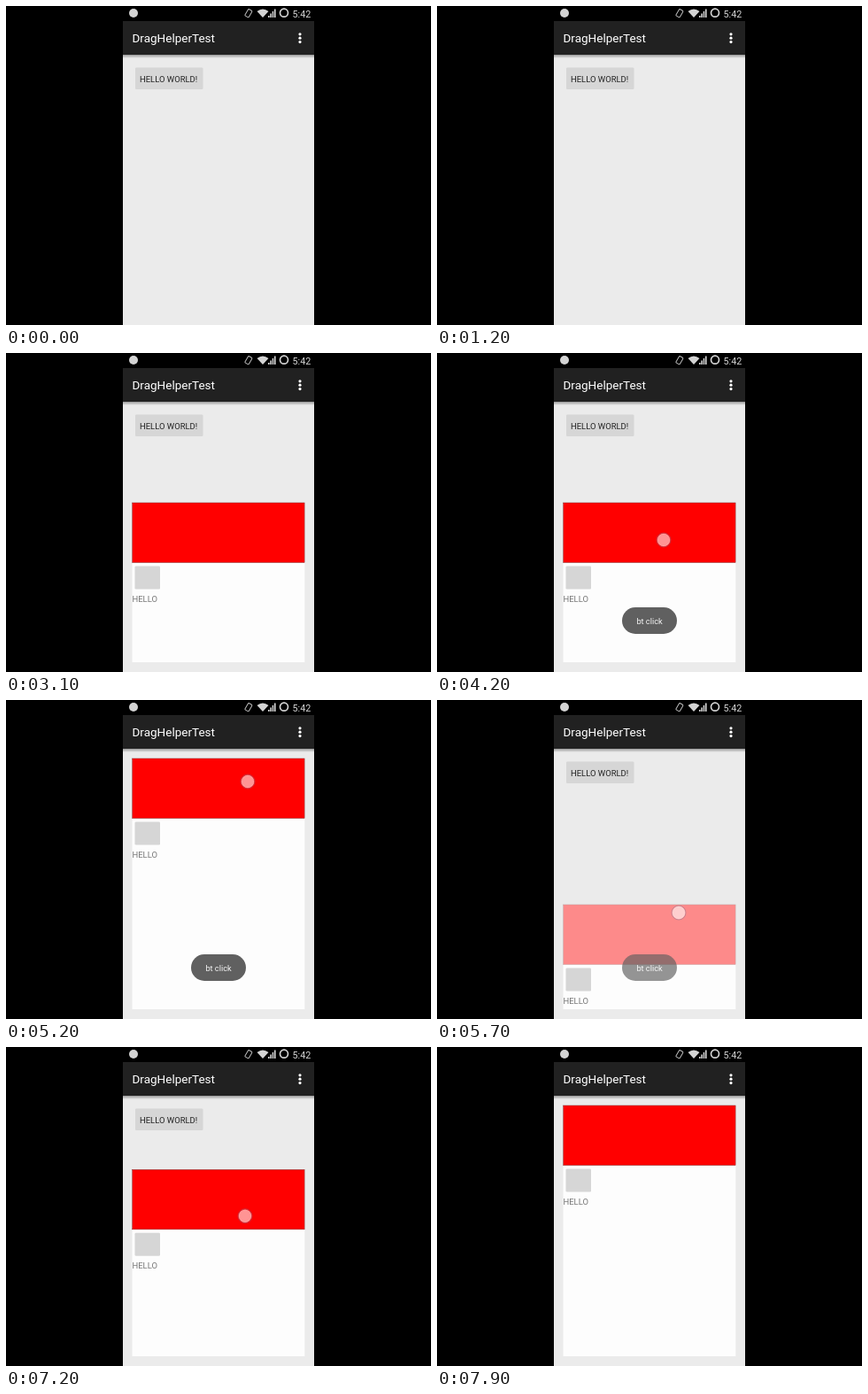
These frames come from a looping animation (480x360 px, 8000 ms). An HTML page:

```html
<!DOCTYPE html>
<html lang="en">
<head>
<meta charset="utf-8">
<title>DragHelperTest</title>
<style>
  html, body { margin: 0; width: 100%; height: 100%; overflow: hidden; background: #000; }
  svg { display: block; width: 100vw; height: 100vh; }
  text { font-family: Roboto, "Open Sans", sans-serif; font-size: 9.45px; }
</style>
</head>
<body>
<svg viewBox="0 0 480 360">
  <defs>
    <linearGradient id="shade" x2="0" y2="1">
      <stop offset="0" stop-color="#000" stop-opacity=".35"/>
      <stop offset="1" stop-color="#000" stop-opacity="0"/>
    </linearGradient>
    <clipPath id="area"><rect x="142" y="65" width="196" height="284"/></clipPath>
  </defs>
  <rect width="480" height="360"/>
  <rect x="132" y="17" width="216" height="343" fill="#ebebeb"/>

  <g fill="#d4d4d4">
    <circle cx="144" cy="8" r="5"/>
    <rect x="271.5" y="4" width="5" height="8.5" rx="1" transform="rotate(30 274 8)" fill="none" stroke="#bbb"/>
    <path d="M290 13 L283.5 6 Q290 1 296.5 6 Z"/>
    <path d="M296 13h1.6v-2H296zM298.3 13h1.6V8.500h-1.600zM300.700 13h1.600V6h-1.600zM303 13h1.600V3.500H303z"/>
    <circle cx="314" cy="7.700" r="4.500" fill="none" stroke="#d4d4d4" stroke-width="1.700"/>
    <text x="323.500" y="12.500" style="font-size:10.800px">5:42</text>
  </g>

  <rect x="132" y="17" width="216" height="38" fill="#212121"/>
  <rect x="132" y="55" width="216" height="4" fill="url(#shade)"/>
  <text x="142.500" y="41" fill="#fff" style="font-size:13.500px">DragHelperTest</text>
  <g fill="#fff">
    <circle cx="332" cy="31.800" r="1.600"/>
    <circle cx="332" cy="36.200" r="1.600"/>
    <circle cx="332" cy="40.600" r="1.600"/>
  </g>

  <rect id="mainButton" x="146" y="69.500" width="76.500" height="24.500" rx="1.300"/>
  <text x="151" y="85.500" fill="#222">HELLO WORLD!</text>

  <g clip-path="url(#area)">
    <g id="panel">
      <rect x="142.500" width="194.800" height="290" fill="#fdfdfd"/>
      <rect id="header" x="142.700" width="194.400" height="67.500" fill="#f00" stroke="#803030" stroke-width=".5"/>
      <rect id="smallButton" x="145.500" y="71.500" width="28.500" height="26" rx="1.300"/>
      <text x="142.500" y="112" fill="#757575">HELLO</text>
    </g>
  </g>

  <g id="toast">
    <rect x="209" y="287" width="62" height="30" rx="15" fill="#606060"/>
    <text x="240" y="306" fill="#f4f4f4" text-anchor="middle" style="font-size:9.200px">bt click</text>
  </g>

  <g id="finger">
    <circle r="8" fill="none" stroke="#77779a" stroke-opacity=".4"/>
    <circle r="7" fill="#fff" fill-opacity=".58" stroke="#fff" stroke-opacity=".35"/>
  </g>
</svg>
<script>
const LOOP = 8000, STEP = 100;
const TOP = 66, REST = 169, LOW = 282, HIDDEN = 350;
const el = id => document.getElementById(id);
const [panel, header, mainButton, smallButton, toast, finger] =
  ["panel", "header", "mainButton", "smallButton", "toast", "finger"].map(el);

// Each key: [time, value, "out" for a decelerating approach]
const panelKeys = [
  [1500, HIDDEN], [1900, REST, "out"], [1950, REST], [2200, 270], [2300, 260],
  [2700, REST, "out"], [4200, REST], [4500, 232], [4600, 232], [5000, TOP],
  [5300, TOP], [5700, 231], [6000, REST, "out"], [6200, REST], [6500, 250],
  [6700, LOW], [7000, REST, "out"], [7150, REST], [7600, TOP, "out"]
];
const toastKeys = [[3700, 0], [3900, 1], [5600, 1], [5900, 0]];

const touches = [
  { from: 300, to: 600, x: [[0, 183]], y: [[0, 82]] },
  { from: 1950, to: 2300, x: [[1950, 248], [2200, 251]], y: [[1950, 215], [2200, 316]] },
  { from: 3500, to: 3800, x: [[0, 160]], y: [[0, 254]] },
  { from: 4100, to: 5800, x: [[4200, 256], [5200, 273]],
    y: [[4200, 211], [4500, 274], [4600, 274], [5200, 92], [5300, 75], [5700, 240]] },
  { from: 6300, to: 6800, x: [[0, 271]], y: [[6200, 178], [6500, 259], [6700, 291]] },
  { from: 7100, to: 7500, x: [[0, 270]], y: [[7150, 205], [7500, 105]] }
];

function sample(keys, t) {
  if (t <= keys[0][0]) return keys[0][1];
  for (let i = 1; i < keys.length; i++) {
    const [t0, v0] = keys[i - 1], [t1, v1, ease] = keys[i];
    if (t > t1) continue;
    const p = (t - t0) / (t1 - t0);
    return v0 + (v1 - v0) * (ease ? 1 - (1 - p) ** 3 : p);
  }
  return keys[keys.length - 1][1];
}

const within = (t, from, to) => t >= from && t < to;
const buttonColor = pressed => pressed ? "#c0c0c0" : "#d6d6d6";

function draw(t) {
  const y = sample(panelKeys, t);
  const redness = Math.max(0, Math.min(1, (LOW - y) / (LOW - REST)));
  panel.setAttribute("transform", `translate(0 ${y.toFixed(2)})`);
  header.setAttribute("opacity", redness);
  mainButton.setAttribute("fill", buttonColor(within(t, 300, 600)));
  smallButton.setAttribute("fill", buttonColor(within(t, 3500, 3800)));
  toast.setAttribute("opacity", sample(toastKeys, t));

  const touch = touches.find(({ from, to }) => within(t, from, to));
  finger.setAttribute("visibility", touch ? "visible" : "hidden");
  if (touch) finger.setAttribute("transform", `translate(${sample(touch.x, t)} ${sample(touch.y, t)})`);
}

const start = performance.now();
function tick() {
  const t = (performance.now() - start) % LOOP;
  draw(Math.floor(t / STEP) * STEP);
  requestAnimationFrame(tick);
}
tick();
</script>
</body>
</html>
```
